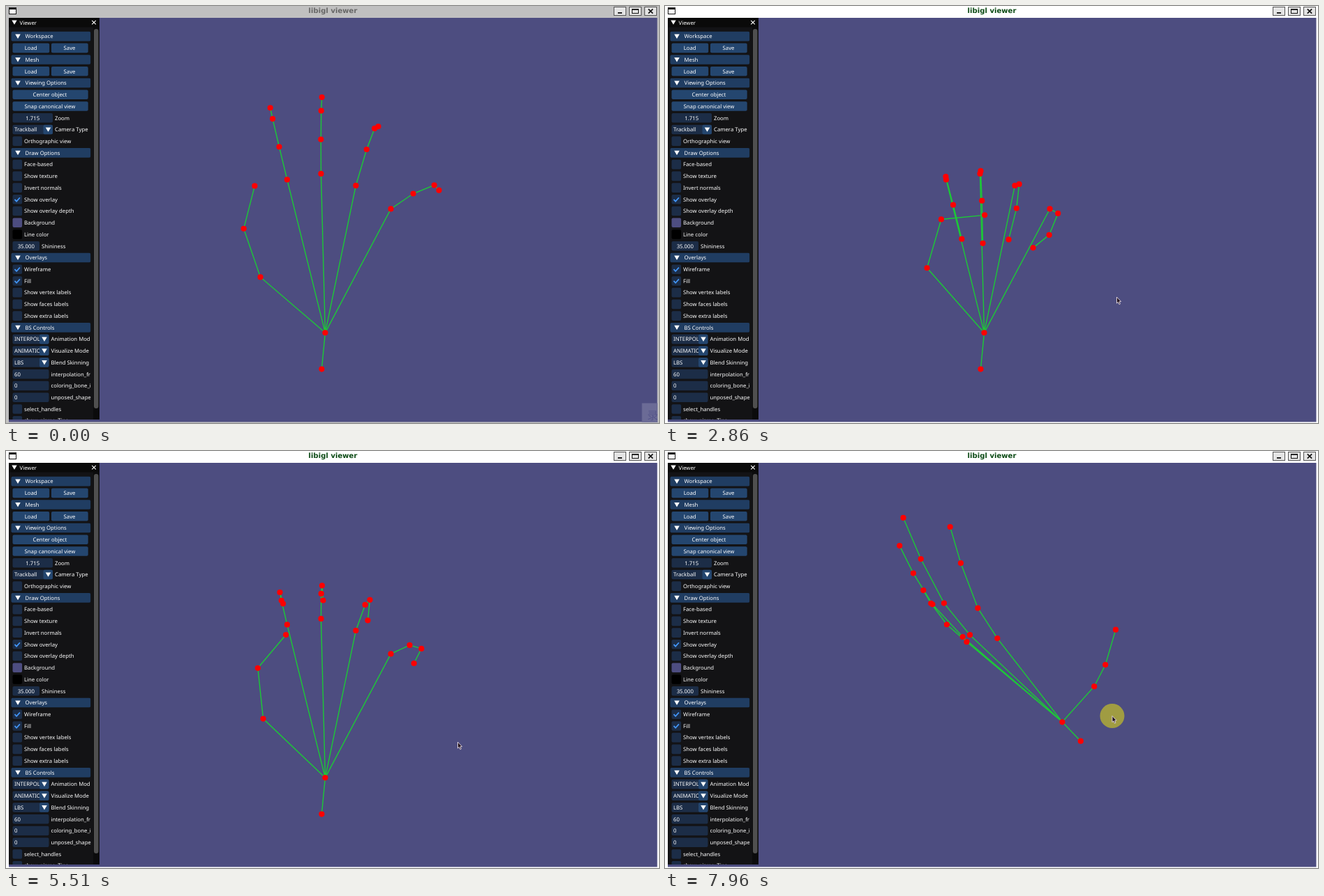
An HTML page that plays this animation: 936 by 599 pixels, repeating every 8000 ms.

```html
<!DOCTYPE html>
<html lang="en">
<head>
<meta charset="utf-8">
<title>libigl viewer</title>
<style>
  html, body { margin: 0; width: 100%; height: 100%; overflow: hidden; background: #4d4d80; }
  svg { display: block; width: 936px; height: 599px; }
  text { font: 7.75px "Noto Sans", sans-serif; fill: #fff; text-rendering: geometricPrecision; white-space: pre; }
  #title { font: bold 10.1px "DejaVu Sans", sans-serif; text-anchor: middle; }
  #badge text { font: 16px "Noto Sans CJK SC", "Noto Sans CJK", sans-serif; fill: #55558a; }
</style>
</head>
<body>
<svg viewBox="0 0 936 599">
  <defs>
    <clipPath id="panelClip"><rect x="4" y="17" width="117.5" height="577"/></clipPath>
    <clipPath id="comboClip"><rect x="9" y="17" width="39" height="577"/></clipPath>
    <clipPath id="stageClip"><rect x="4" y="17" width="930" height="581"/></clipPath>
  </defs>
  <rect id="frame" width="936" height="599"/>
  <rect x="4" y="17" width="929.5" height="580.5" fill="#4d4d80"/>
  <text id="title" x="468.5" y="9.7">libigl viewer</text>
  <g id="chrome"></g>
  <g id="panel"></g>
  <g clip-path="url(#stageClip)">
    <path id="bones" fill="none" stroke="#1cc936" stroke-width="1.4"/>
    <path id="joints" fill="none" stroke="#f00" stroke-width="8.2" stroke-linecap="round"/>
    <g id="badge">
      <rect x="911.5" y="570.5" width="23" height="28" fill="#6b6b96"/>
      <text x="919" y="594">录</text>
    </g>
    <g id="cursor">
      <circle id="press" r="17.5" fill="#a09c42"/>
      <path d="M0 0V9L2 7.3 3.5 10.6 5 9.9 3.6 6.8 6.2 6.5Z" fill="#241420" stroke="#eadfe6" stroke-width=".9"/>
    </g>
  </g>
</svg>
<script>
const $ = id => document.getElementById(id);

// ---------- static interface ----------
const HEAD = '#203d62', BUTTON = '#24466f', FIELD = '#1c2d47';
const rect = (x, y, w, h, fill, more = '') => `<rect x="${x}" y="${y}" width="${w}" height="${h}" fill="${fill}" ${more}/>`;
const label = (x, y, s, more = '') => `<text x="${x}" y="${y + 2.8}" ${more}>${s}</text>`;
const middle = (x, y, s) => label(x, y, s, 'text-anchor="middle"');
const arrow = (x, y, r = 3.8) => `<path d="M${x - r} ${y - r * .8}h${2 * r}l${-r} ${r * 1.7}z" fill="#fff"/>`;
const box = (x, y, w, fill) => rect(x, y - 6.8, w, 13.6, fill, 'rx="2"');

const head = s => y => box(7.5, y, 113.8, HEAD) + arrow(17, y) + label(27.5, y, s);
const pair = y => box(9.5, y, 52.7, BUTTON) + middle(35.7, y, 'Load') + box(65, y, 52.7, BUTTON) + middle(91, y, 'Save');
const button = s => y => box(9.5, y, 108.2, BUTTON) + middle(63, y, s);
const number = (w, value, s) => y => box(9.5, y, w, FIELD) + middle(9.5 + w / 2, y, value) + label(w + 12.5, y, s);
const input = (value, s) => y => box(9.5, y, 52, FIELD) + label(12, y, value) + label(64.5, y, s);
const combo = (w, value, s) => y => box(9.5, y, w, FIELD) +
  label(12, y, value, 'clip-path="url(#comboClip)"') +
  box(w - 4, y, 13.5, BUTTON) + arrow(w + 3, y) + label(w + 12.5, y, s);
const swatch = (s, fill) => y => box(9.5, y, 13.6, fill) + label(26, y, s);
const check = (s, on) => y => swatch(s, FIELD)(y) +
  (on ? `<path d="M12.5 ${y}l2.6 2.8 4.8-5.4" fill="none" stroke="#4296fa" stroke-width="1.7"/>` : '');

const rows = [
  head('Workspace'), pair, head('Mesh'), pair,
  head('Viewing Options'), button('Center object'), button('Snap canonical view'),
  number(57.5, '1.715', 'Zoom'), combo(57.5, 'Trackball', 'Camera Type'), check('Orthographic view'),
  head('Draw Options'), check('Face-based'), check('Show texture'), check('Invert normals'),
  check('Show overlay', true), check('Show overlay depth'),
  swatch('Background', '#4d4d80'), swatch('Line color', '#000'), number(38.5, '35.000', 'Shininess'),
  head('Overlays'), check('Wireframe', true), check('Fill', true),
  check('Show vertex labels'), check('Show faces labels'), check('Show extra labels'),
  head('BS Controls'), combo(52, 'INTERPOLATE', 'Animation Mod'), combo(52, 'ANIMATION', 'Visualize Mode'),
  combo(52, 'LBS', 'Blend Skinning'), input('60', 'interpolation_fr'),
  input('0', 'coloring_bone_id'), input('0', 'unposed_shape'), check('select_handles'), check('show_gizmo_Tips')
];

$('panel').innerHTML =
  rect(4, 17, 130, 577, '#131315') + rect(4, 17, 130, 13.5, '#0a0a0a') +
  arrow(12, 23.5, 3.7) + label(19.5, 23.8, 'Viewer') +
  '<path d="M123.2 20.8l5.6 5.6m0-5.6l-5.6 5.6" stroke="#fff" stroke-width="1.1"/>' +
  rect(125, 30.5, 9, 563.5, '#0b0b0c') + rect(126, 33, 6.5, 545, '#4f4f4f', 'rx="3"') +
  `<g clip-path="url(#panelClip)">${rows.map((row, i) => row(43.6 + 16.73 * i)).join('')}</g>`;

const edge = 'stroke="#555" stroke-width="1"';
$('chrome').innerHTML =
  rect(4.5, 2.5, 10, 9, '#fff', 'stroke="#111"') + rect(4, 2, 11, 3, '#111') +
  [871.5, 893.5, 915.5].map(x => rect(x, 1.5, 17, 12, '#e4e4e4', edge)).join('') +
  rect(877, 9, 6, 1.8, '#111') +
  rect(897.5, 4.5, 9, 6, 'none', 'stroke="#111"') + rect(897, 4, 10, 1.8, '#111') +
  '<path d="M920.8 4.3l6.4 6.4m0-6.4l-6.4 6.4" stroke="#111" stroke-width="1.7"/>';

// ---------- hand: x right, y down, z towards the viewer, origin at the stage centre ----------
const CENTER = [469, 307.4], CAMERA = 700;
const WRIST = [-11.2, 158, 17], ROOT = [-16.1, 209, 17];
// heading: degrees from upright; lean: sideways drift of the curl; tipCurl: degrees the last bone turns
const fingers = [
  { knuckle: [-64.7, -56.8, 14], heading: -14, bones: [55.5, 61.5, 42.5], lean: .08, tipCurl: 167 },
  { knuckle: [-17.4, -66.3, 2], heading: -1, bones: [57.7, 63, 52], lean: .04, tipCurl: 167 },
  { knuckle: [32.3, -49.2, 4], heading: 12.7, bones: [63.5, 50, 41], lean: .05, tipCurl: 193 },
  { knuckle: [81, -15.7, 14], heading: 43, bones: [44, 47, 28], lean: .2, tipCurl: 205 }
];

const rad = deg => deg * Math.PI / 180;
const add = (a, b) => a.map((v, i) => v + b[i]);
const mix = (a, b, s) => a.map((v, i) => v + (b[i] - v) * s);
const dot = (a, b) => a.reduce((sum, v, i) => sum + v * b[i], 0);
const cross = (a, b) => [a[1] * b[2] - a[2] * b[1], a[2] * b[0] - a[0] * b[2], a[0] * b[1] - a[1] * b[0]];
const unit = a => a.map(v => v / Math.hypot(...a));
const clamp = v => Math.min(1, Math.max(0, v));

function finger({ knuckle, heading, bones, lean, tipCurl }, u) {
  const sin = Math.sin(rad(heading)), cos = Math.cos(rad(heading));
  const bends = [1 + 98 * u, 12 + 128 * u, 16 + tipCurl * u].map(rad);
  const joints = [knuckle];
  bones.forEach((length, i) => {
    const along = length * Math.cos(bends[i]), out = length * Math.sin(bends[i]);
    joints.push(add(joints[i], [along * sin + out * lean * cos, -along * cos + out * lean * sin, out]));
  });
  return joints;
}

// The thumb sweeps across the palm, nearly parallel to it.
function thumb(u) {
  const swing = (from, length, angle, rise) =>
    add(from, [length * Math.sin(rad(angle)), -length * Math.cos(rad(angle)), rise]);
  const base = [-103.7 + 19.7 * u, 85 - 23.8 * u, 60];
  const knuckle = swing(base, 66.8, -45.8 + 68 * u, 11);
  return [base, knuckle, swing(knuckle, 56.5, -36.8 + 131 * u, 22)];
}

// ---------- camera ----------
const views = [
  { x: [1, 0, 0], y: [0, 1, 0] },
  { x: [.281, .408, .868], y: [-.437, .86, -.263] },
  { x: [-.487, .597, .638], y: [-.196, .637, -.745] }
];
function camera(t) {
  const s1 = clamp((t - 5930) / 800), s2 = clamp((t - 7350) / 610) ** 1.5;
  const [a, b, s] = s2 > 0 ? [views[1], views[2], s2] : [views[0], views[1], s1 * s1 * (3 - 2 * s1)];
  const x = unit(mix(a.x, b.x, s)), z = unit(cross(x, mix(a.y, b.y, s))), y = cross(z, x);
  return q => {
    const zoom = CAMERA / (CAMERA - dot(z, q));
    return [CENTER[0] + zoom * dot(x, q), CENTER[1] + zoom * dot(y, q)].map(v => v.toFixed(2));
  };
}

// ---------- timing: [ms, value...] with straight runs between ----------
const closure = [[30, .42], [710, 0], [1008, 0], [2735, 1], [4465, 0], [6190, 1], [7920, 0], [8000, .046]];
const pointer = [[30, 930, 590], [480, 670, 387], [990, 670, 387], [1150, 650, 440.5], [2620, 650, 440.5],
  [2760, 647.5, 418], [5600, 647.5, 418], [5900, 568, 392], [6690, 619, 383], [6900, 625, 382],
  [7400, 625, 382], [7960, 641, 380.5]];
const presses = [[520, 690], [5930, 6690], [7330, 8000]];

function along(keys, t) {
  let k = 0;
  while (k < keys.length - 2 && t > keys[k + 1][0]) k++;
  const [a, b] = [keys[k], keys[k + 1]];
  return mix(a.slice(1), b.slice(1), clamp((t - a[0]) / (b[0] - a[0])));
}
const show = (id, on) => { $(id).style.display = on ? '' : 'none'; };

function draw(t) {
  const [u] = along(closure, t);
  const project = camera(t);
  const wrist = project(WRIST);
  let bones = '', joints = `M${wrist}h0`;
  for (const chain of [[ROOT], thumb(u), ...fingers.map(f => finger(f, u))]) {
    const spots = chain.map(project);
    bones += `M${wrist}L${spots.join('L')}`;
    joints += spots.map(p => `M${p}h0`).join('');
  }
  $('bones').setAttribute('d', bones);
  $('joints').setAttribute('d', joints);

  const focused = t >= presses[0][0];
  $('frame').setAttribute('fill', focused ? '#fff' : '#c0c0c0');
  $('title').style.fill = focused ? '#0b4a14' : '#666';
  show('badge', t < 30);
  show('cursor', t >= 30);
  show('press', presses.some(([from, to]) => t >= from && t < to));
  $('cursor').setAttribute('transform', `translate(${along(pointer, t)})`);
}

const start = performance.now();
function tick() {
  draw((performance.now() - start) % 8000);
  requestAnimationFrame(tick);
}
tick();
</script>
</body>
</html>
```
